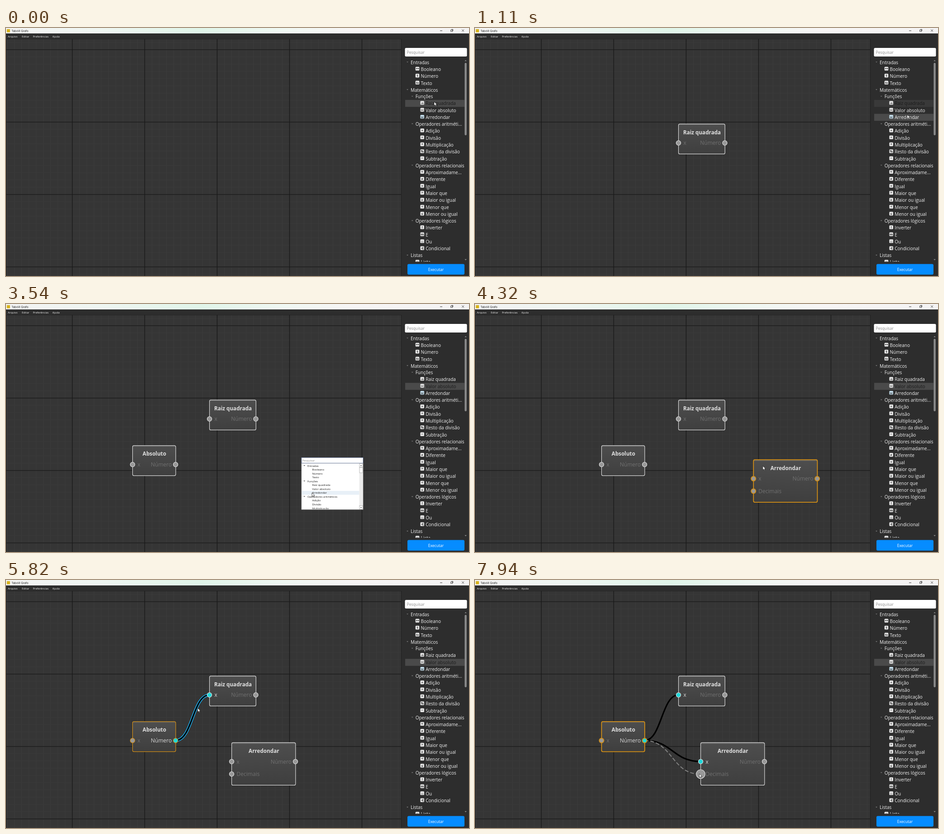
An HTML page with a canvas for the animation above (8 s loop, 1023x548 px).

```html
<!DOCTYPE html>
<html lang="pt">
<head>
<meta charset="utf-8">
<title>Editor de nós</title>
<style>
html, body { margin: 0; width: 100%; height: 100%; overflow: hidden; background: #2d2d2d; }
canvas { display: block; }
</style>
</head>
<body>
<canvas id="stage" width="1023" height="548"></canvas>
<script>
const ctx = document.getElementById('stage').getContext('2d');
const LOOP = 8000;
const FACE = '"Open Sans", "Noto Sans", sans-serif';

// ---------- helpers ----------
function text(str, x, y, size, color, align = 'left', weight = 400) {
  ctx.font = `${weight} ${size}px ${FACE}`;
  ctx.textAlign = align;
  ctx.fillStyle = color;
  ctx.fillText(str, x, y);
}
function rect(x, y, w, h, color) {
  ctx.fillStyle = color;
  ctx.fillRect(x, y, w, h);
}
function roundPath(x, y, w, h, r) {
  ctx.beginPath();
  ctx.roundRect(x, y, w, h, r);
}
function roundFill(x, y, w, h, r, color) {
  roundPath(x, y, w, h, r);
  ctx.fillStyle = color;
  ctx.fill();
}
function line(x1, y1, x2, y2, color, width) {
  ctx.beginPath();
  ctx.moveTo(x1, y1);
  ctx.lineTo(x2, y2);
  ctx.strokeStyle = color;
  ctx.lineWidth = width;
  ctx.stroke();
}
// dir 1 points down, -1 points up
function triangle(x, y, r, dir, color) {
  ctx.beginPath();
  ctx.moveTo(x - r, y - dir * r / 2);
  ctx.lineTo(x + r, y - dir * r / 2);
  ctx.lineTo(x, y + dir * r / 2);
  ctx.fillStyle = color;
  ctx.fill();
}

// ---------- pointer path: time, x, y ----------
const PATH = [
  [0, 946, 163], [90, 946, 163], [170, 925, 130], [240, 884, 80], [320, 650, 120],
  [400, 449, 212], [570, 449, 212], [700, 600, 202], [900, 880, 196], [1110, 955, 191.5],
  [1340, 947, 181], [1420, 937, 181], [1500, 880, 186], [1850, 279, 313], [1950, 279, 313],
  [2200, 438, 312], [2270, 438, 312], [2590, 653, 339], [2900, 653, 339], [3370, 676, 417],
  [3540, 676, 417], [3770, 680, 415], [4000, 680, 415], [4160, 674, 353], [4230, 674, 353],
  [4600, 519, 373], [4730, 519, 373], [4800, 456, 368], [4930, 376, 354], [5020, 376, 354],
  [5500, 447, 256], [5660, 447, 256], [5740, 423.5, 283], [5850, 423.5, 283], [6080, 375, 354],
  [6160, 375, 354], [6600, 490, 398], [6670, 496, 402], [7000, 496, 402], [7300, 375, 354],
  [7400, 375, 354], [7790, 480, 415], [7870, 492, 426], [7940, 495.5, 428]
];
function pointerAt(t) {
  const i = PATH.findIndex(k => k[0] > t);
  if (i < 0) return { x: 495.5, y: 428 };
  const [t0, x0, y0] = PATH[i - 1], [t1, x1, y1] = PATH[i];
  const u = (t - t0) / (t1 - t0);
  return { x: x0 + (x1 - x0) * u, y: y0 + (y1 - y0) * u };
}

// ---------- side tree: level, label, icon glyph ----------
const TREE = [
  [0, 'Entradas'], [1, 'Booleano', '⊶'], [1, 'Número', '1'], [1, 'Texto', 'Aa'],
  [0, 'Matemáticos'],
  [1, 'Funções'], [2, 'Raiz quadrada', '√x'], [2, 'Valor absoluto', '|x|'], [2, 'Arredondar', '(x)'],
  [1, 'Operadores aritméti...'], [2, 'Adição', '+'], [2, 'Divisão', '÷'], [2, 'Multiplicação', '×'],
  [2, 'Resto da divisão', '%'], [2, 'Subtração', '−'],
  [1, 'Operadores relacionais'], [2, 'Aproximadame...', '≈'], [2, 'Diferente', '≠'], [2, 'Igual', '='],
  [2, 'Maior que', '>'], [2, 'Maior ou igual', '≥'], [2, 'Menor que', '<'], [2, 'Menor ou igual', '≤'],
  [1, 'Operadores lógicos'], [2, 'Inverter', '!'], [2, 'E', '&&'], [2, 'Ou', '||'], [2, 'Condicional', '⊰'],
  [0, 'Listas'], [1, 'Lista', '[ ]']
].map(([level, label, glyph]) => ({ level, label, glyph, h: glyph ? 15.4 : 14.65 }));
let rowTop = 68.7;
for (const row of TREE) {
  row.top = rowTop;
  row.mid = rowTop + row.h / 2;
  rowTop += row.h;
}
const [INPUTS, SQRT, ABS] = [0, 6, 7];

function icon(row, x, y) {
  roundFill(x, y - 4.4, 8.6, 8.4, 1.6, row.label === 'Arredondar' ? '#c3dcea' : '#e4e4e4');
  text(row.glyph, x + 4.3, y + 2.2, row.glyph.length > 1 ? 4.6 : 7, '#2a2a2a', 'center', 700);
}
function rowBody(row, color) {
  const x = 894 + row.level * 10.7;
  if (row.glyph) {
    icon(row, x, row.mid - 1);
    text(row.label, x + 11.8, row.mid + 3.7, 10, color);
  } else {
    triangle(x - 7, row.mid - 0.7, 1.9, 1, '#858585');
    text(row.label, x, row.mid + 3.7, 10, color);
  }
}
function hoverRow(t, p) {
  if (t < 130) return SQRT;
  if (t < 890) return INPUTS;
  if (t < 1400) return TREE.findIndex(r => p.y >= r.top && p.y < r.top + r.h);
  return ABS;
}
function sidePanel(t, p) {
  rect(873, 24, 150, 524, '#2d2d2d');
  line(873.5, 24, 873.5, 548, '#202020', 1);
  roundFill(881.5, 44, 137, 19, 2.5, '#ffffff');
  text('Pesquisar', 885.5, 57, 8.6, '#8b8b8b');

  const selected = t < 1300 ? SQRT : ABS, hover = hoverRow(t, p);
  ctx.save();
  ctx.beginPath();
  ctx.rect(878, 66, 145, 450.5);
  ctx.clip();
  TREE.forEach((row, i) => {
    if (i === hover) rect(882, row.top, 131, row.h, '#4a4a4a');
    else if (i === selected) rect(882, row.top, 131, row.h, '#393939');
    rowBody(row, i === selected ? '#1b1b1b' : '#f2f2f2');
  });
  ctx.restore();

  triangle(1015.6, 72, 2.3, -1, '#8f8f8f');
  triangle(1015.6, 512, 2.3, 1, '#8f8f8f');
  roundFill(1013.4, 77, 4.4, 160, 2, '#8a8a8a');
  roundFill(887, 521.5, 126, 23.5, 3, '#068cff');
  text('Executar', 950, 536.6, 8.6, '#ffffff', 'center');
}

// ---------- window frame ----------
function windowBar() {
  const g = ctx.createLinearGradient(0, 0, 1023, 0);
  [[0, '#f3f3f3'], [0.2, '#eff6f2'], [0.42, '#e0f5e9'], [0.6, '#f0f8f3'], [0.75, '#f7f5f5'], [1, '#f4f3f3']]
    .forEach(([at, c]) => g.addColorStop(at, c));
  rect(0, 0, 1023, 12, g);
  rect(1.8, 2.5, 7, 7, '#d8b21a');
  text('TaboVi Grafo', 12.5, 8.6, 6.2, '#1d1d1d');
  line(959, 6, 964, 6, '#222', 0.9);
  ctx.strokeStyle = '#222';
  ctx.lineWidth = 0.8;
  ctx.strokeRect(982.8, 4.2, 3.6, 3.6);
  ctx.beginPath();
  ctx.moveTo(984, 3);
  ctx.lineTo(987.6, 3);
  ctx.lineTo(987.6, 6.6);
  ctx.stroke();
  line(1007.2, 3.2, 1012, 8, '#222', 0.8);
  line(1012, 3.2, 1007.2, 8, '#222', 0.8);

  rect(0, 12, 1023, 12, '#2d2d2d');
  [['Arquivo', 4], ['Editar', 35], ['Preferências', 59.5], ['Ajuda', 102.5]]
    .forEach(([label, x]) => text(label, x, 20.7, 6, '#f0f0f0'));
}
function grid() {
  rect(0, 24, 873, 524, '#353535');
  const lines = (step, color, width) => {
    for (let x = 146.5 % step; x < 873; x += step) line(x, 24, x, 548, color, width);
    for (let y = 24 + (23.8 % step); y < 548; y += step) line(0, y, 873, y, color, width);
  };
  lines(16, '#3b3b3b', 1);
  lines(160, '#191919', 1.3);
  line(0.5, 24, 0.5, 548, '#191919', 1);
  line(0, 24, 873, 24, '#191919', 1);
}

// ---------- nodes ----------
const OUT = { x: 374.7, y: 354.7 };
const SQRT_IN = { x: 449.6, y: 254 };
const ROUND_IN = { x: 498.6, y: 401 };
const LINK1 = 5640, LINK2 = 7000;
const DRAGS = [[5010, LINK1], [6150, LINK2], [7390, LOOP]];

function wire(a, b) {
  const dx = b.x - a.x;
  const reach = Math.min(213, Math.abs(dx)) * (dx > 0 ? 0.5 : 1);
  const dy = b.y - a.y + 20;
  const lift = dx > 0 ? 0 : Math.sign(dy) * Math.min(213, Math.abs(dy));
  ctx.beginPath();
  ctx.moveTo(a.x, a.y);
  ctx.bezierCurveTo(a.x + reach, a.y + lift, b.x - reach, b.y - lift, b.x, b.y);
}
function strokeWire(a, b, color, width) {
  wire(a, b);
  ctx.strokeStyle = color;
  ctx.lineWidth = width;
  ctx.stroke();
}
function port(x, y, edge, width, linked, pull) {
  let r = 5.1;
  if (pull && !linked) {
    const d = Math.hypot(pull.x - x, pull.y - y);
    if (d < 42.7) r *= 2 - d / 42.7;
  }
  ctx.beginPath();
  ctx.arc(x, y, r, 0, Math.PI * 2);
  ctx.fillStyle = linked ? '#1fd8da' : '#989898';
  ctx.fill();
  ctx.strokeStyle = edge;
  ctx.lineWidth = width;
  ctx.stroke();
}
// ins: list of [label, linked]
function node(n, p, pull) {
  const { x, y, w, h } = n;
  const inside = p.x > x && p.x < x + w && p.y > y && p.y < y + h;
  const edge = n.selected ? '#d48f15' : '#dadada';
  const width = inside || n.held ? 1.8 : 1.2;
  const g = ctx.createLinearGradient(0, y, 0, y + h);
  [[0, '#717171'], [0.04, '#4d4d4d'], [0.97, '#3f3f3f'], [1, '#3a3a3a']].forEach(([at, c]) => g.addColorStop(at, c));
  roundFill(x, y, w, h, 3, g);
  ctx.strokeStyle = edge;
  ctx.lineWidth = width;
  ctx.stroke();
  text(n.title, x + w / 2 + 0.6, y + 22.4, 11.7, '#e0e0e0', 'center', 700);
  const tint = linked => linked ? '#d8d8d8' : '#717171';
  n.ins.forEach(([label, linked], i) => {
    const py = y + 41.8 + i * 27.6;
    text(label, x + 11, py + 4.4, 12, tint(linked));
    port(x, py, edge, width, linked, pull);
  });
  text('Número', x + w - 8.8, y + 46.2, 12, tint(n.out), 'right');
  port(x + w - 0.3, y + 41.8, edge, width, n.out);
}
function graph(t, p) {
  const pull = DRAGS.some(([a, b]) => t >= a && t < b) ? p : null;
  const linked = t >= LINK1, linked2 = t >= LINK2;
  if (linked) {
    if (t > 5700 && t < 6000) strokeWire(OUT, SQRT_IN, '#1cabea', 6.2);
    strokeWire(OUT, SQRT_IN, '#000', 3.2);
  }
  if (linked2) strokeWire(OUT, ROUND_IN, '#000', 3.2);
  if (pull) {
    ctx.setLineDash([8.5, 4.2]);
    strokeWire(OUT, { x: p.x + 0.5, y: p.y + 0.7 }, '#808080', 2.1);
    ctx.setLineDash([]);
  }
  if (t >= 570) node({ x: 449.6, y: 212.2, w: 102.7, h: 66.2, title: 'Raiz quadrada', ins: [['x', linked]] }, p, pull);
  if (t >= 1890) {
    node({ x: 279.6, y: 312.9, w: 95.4, h: 66.4, title: 'Absoluto', ins: [['x', false]],
      out: linked, selected: t >= 4990, held: !!pull }, p);
  }
  if (t >= 3925) {
    let x = 498.6, y = 359.4;
    if (t < 4230) [x, y] = [653, 339];
    else if (t < 4600) [x, y] = [p.x - 20.6, p.y - 13.8];
    node({ x, y, w: 141.2, h: 94, title: 'Arredondar', ins: [['x', linked2], ['Decimais', false]],
      selected: t >= 4160 && t < 4990 }, p, pull);
  }
}

// ---------- pop-up list ----------
const MENU = ['*Entradas', 'Booleano', 'Número', 'Texto', '*Funções', 'Raiz quadrada', 'Valor absoluto',
  'Arredondar', '*Operadores aritméticos', 'Adição', 'Divisão', 'Multiplicação'];

function popup(p) {
  rect(652.8, 339.3, 136.2, 115, '#ffffff');
  ctx.save();
  ctx.beginPath();
  ctx.rect(653, 339, 136, 114.6);
  ctx.clip();
  MENU.forEach((item, i) => {
    const mid = 357.5 + i * 8.53;
    if (Math.abs(p.y + 0.5 - mid) <= 4.265) rect(653.5, mid - 4.2, 127, 8.5, '#e8f0f7');
    const head = item[0] === '*';
    if (head) triangle(659.2, mid - 0.3, 2, 1, '#505050');
    text(head ? item.slice(1) : item, head ? 666 : 676.5, mid + 2.2, 6, '#1a1a1a');
  });
  ctx.restore();
  rect(780.6, 352.4, 8, 101.4, '#ececec');
  ctx.lineWidth = 0.7;
  ctx.strokeStyle = '#a5a5a5';
  [[352.8, 8], [361.4, 11.6], [445.6, 8]].forEach(([y, h]) => {
    rect(781, y, 7, h, '#fbfbfb');
    ctx.strokeRect(781, y, 7, h);
  });
  triangle(784.5, 356.8, 1.8, -1, '#444');
  triangle(784.5, 449.8, 1.8, 1, '#444');
  ctx.strokeRect(653, 352, 136, 102);
  ctx.strokeStyle = '#5b6f9e';
  ctx.strokeRect(653, 339.6, 136, 12);
  text('Pesquisar', 655, 348, 6, '#858585');
}

// ---------- dragged row and pointer ----------
function ghost(row, p, dy) {
  ctx.save();
  ctx.translate(p.x - 947, p.y - row.top - dy);
  ctx.globalAlpha = 0.8;
  rect(909, row.top, 104, row.h, '#4a4a4a');
  rowBody(row, '#1b1b1b');
  ctx.restore();
}
function pointer({ x, y }) {
  ctx.beginPath();
  [[0, 0], [0, 8.6], [2, 6.8], [3.4, 9.7], [4.8, 9], [3.5, 6.2], [6.2, 6.2]]
    .forEach(([dx, dy]) => ctx.lineTo(x + dx, y + dy));
  ctx.closePath();
  ctx.fillStyle = '#ffffff';
  ctx.fill();
  ctx.strokeStyle = '#111';
  ctx.lineWidth = 0.7;
  ctx.stroke();
}

function draw(t) {
  const p = pointerAt(t);
  grid();
  graph(t, p);
  sidePanel(t, p);
  windowBar();
  if (t >= 2750 && t < 3925) popup(p);
  if (t >= 130 && t < 570) ghost(TREE[SQRT], p, 6);
  if (t >= 1415 && t < 1890) ghost(TREE[ABS], p, 6);
  pointer(p);
}

const start = performance.now();
function tick() {
  draw((performance.now() - start) % LOOP);
  requestAnimationFrame(tick);
}
tick();
</script>
</body>
</html>
```
